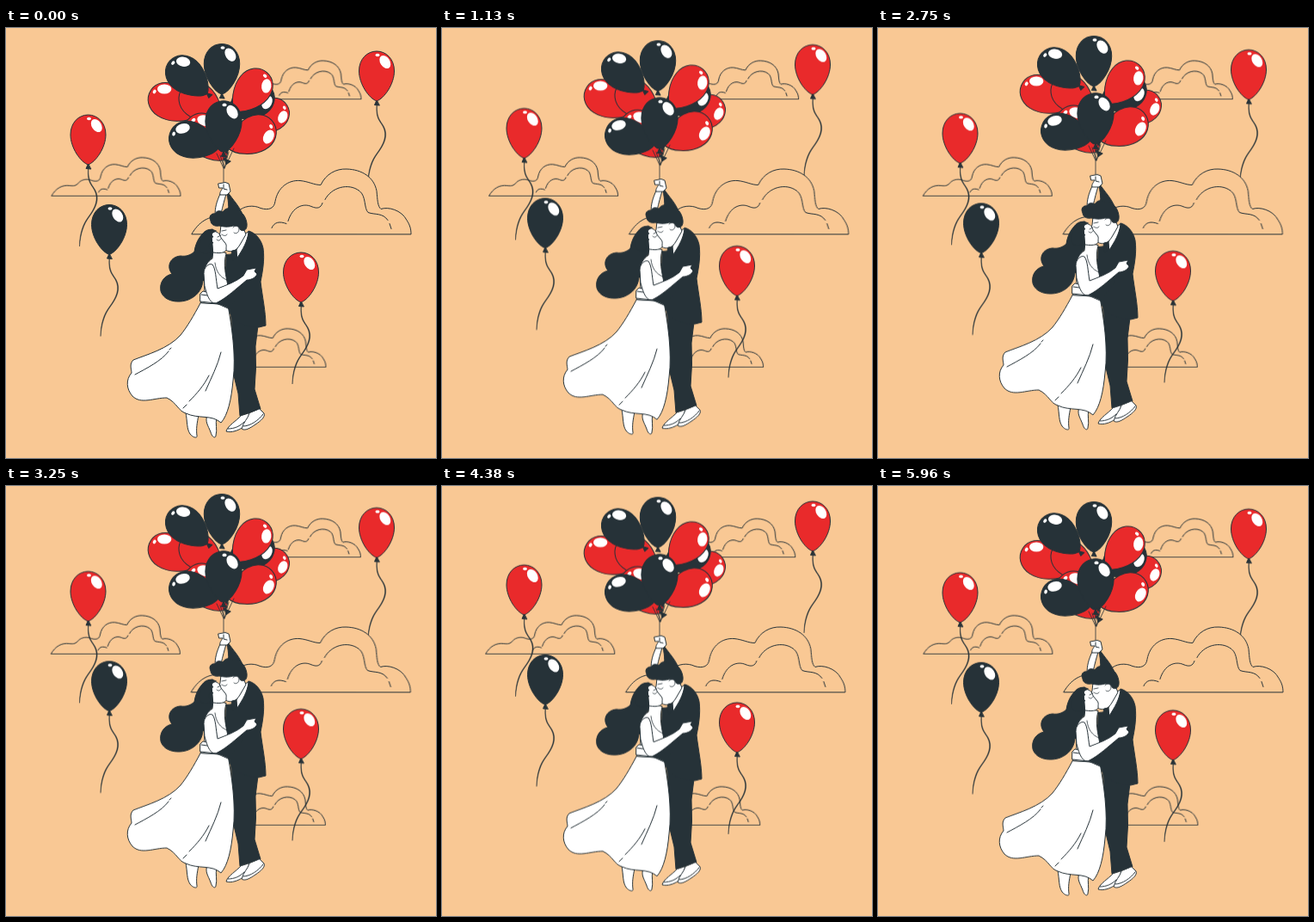
These frames come from a looping animation (500 by 500 pixels, 6 s). An HTML page:

```html
<!DOCTYPE html>
<html lang="en">
<head>
<meta charset="utf-8">
<title>Couple with balloons</title>
<style>
  html, body { margin: 0; width: 100%; height: 100%; overflow: hidden; background: #f9c894; }
  svg { display: block; width: 100%; height: 100%; }
  .line { fill: none; }
  .red { fill: #e92a2b; }
  .dark { fill: #263238; }
  .white { fill: #fff; }
  .small { stroke-width: 1.7; }
  .cloud { fill: #f9c894; animation: sway 6s linear infinite; }
  .float { animation: rise 3s linear infinite; }
  .couple { animation: rise 6s linear infinite; }
  @keyframes rise {
    50% { transform: translateY(-10px); }
  }
  @keyframes sway {
    10%, 90% { transform: translateX(-1px); }
    20%, 80% { transform: translateX(2px); }
    30%, 50%, 70% { transform: translateX(-4px); }
    40%, 60% { transform: translateX(4px); }
  }
</style>
</head>
<body>
<svg viewBox="0 0 500 500" stroke="#263238" stroke-linecap="round" stroke-linejoin="round">
  <defs>
    <g id="cloud">
      <path d="M0,0 C8,-14 20,-22 36,-20 C46,-19 48,-20 54,-26 C60,-33 72,-34 80,-30 C90,-27 96,-30 97,-38 C100,-54 112,-63 126,-62 C136,-61 142,-57 150,-57 C156,-70 168,-76 180,-75.5 C198,-75 212,-66 215,-50 C216,-40 216,-32 220,-29 C228,-32 244,-28 250,-16 C254,-10 255,-5 255,0Z"/>
      <path class="line" d="M93,-7 C96,-14 102,-15 110,-12 M112,-15 C117,-32 130,-36 139,-32 C146,-29 150,-30 152,-36 M155,-40 C162,-54 182,-60 195,-50 C203,-44 200,-30 205,-25 C213,-22 222,-25 228,-16 M230,-12 L232,-6"/>
    </g>
    <!-- balloon tip sits at 0,0 -->
    <g id="balloon">
      <path class="dark" d="M0,-1 L-2.5,4.5 L3,5Z"/>
      <path d="M0,0 C-9,-3 -20.5,-20 -20.5,-35 C-20.5,-49 -11,-58 0,-58 C11,-58 20.5,-49 20.5,-35 C20.5,-20 9,-3 0,0Z"/>
      <g class="white" stroke="none">
        <ellipse cx="9.8" cy="-45.5" rx="5.6" ry="8.2" transform="rotate(-33 9.8 -45.5)"/>
        <ellipse cx="1" cy="-53.5" rx="2.5" ry="1.8"/>
      </g>
    </g>
    <g id="loose">
      <path class="dark" stroke-width=".5" d="M0,5 C-1,20 3,22 7,29 C13,40 8,50 0,61 C-6,69 -10,80 -10,95 C-9,80 -5,69 1,61 C9,50 14,40 8,29 C4,22 0,20 0.3,5Z"/>
      <use href="#balloon"/>
    </g>
  </defs>

  <g class="float red"><use href="#loose" x="431" y="85"/></g>
  <g class="cloud">
    <use class="small" href="#cloud" transform="translate(263 82.5) scale(.588)"/>
    <use href="#cloud" transform="translate(216 239.5)"/>
    <use class="small" href="#cloud" transform="translate(53 195) scale(.588)"/>
    <use class="small" href="#cloud" transform="translate(222 394) scale(.588)"/>
  </g>
  <g class="float">
    <use class="red" href="#loose" x="95.5" y="159"/>
    <use class="dark" href="#loose" x="120" y="263.5"/>
    <use class="red" href="#loose" x="343" y="319"/>
  </g>

  <g class="couple">
    <use class="red" href="#balloon" transform="translate(217 104) rotate(-57)"/>
    <use class="red" href="#balloon" transform="translate(250 107) rotate(-50)"/>
    <use class="dark" href="#balloon" transform="translate(234 76.5) rotate(-49)"/>
    <use class="dark" href="#balloon" transform="translate(251 77) scale(1.01)"/>
    <use class="red" href="#balloon" transform="translate(281.5 118) rotate(58) scale(.92)"/>
    <use class="dark" href="#balloon" transform="translate(259 100) rotate(61)"/>
    <use class="red" href="#balloon" transform="translate(266 96) rotate(40)"/>
    <use class="red" href="#balloon" transform="translate(255 153) rotate(-40) scale(1.1)"/>
    <use class="red" href="#balloon" transform="translate(259 140.5) rotate(61) scale(1.04)"/>
    <use class="dark" href="#balloon" transform="translate(247 140) rotate(-73) scale(1.02)"/>
    <path class="line" stroke-width=".8" d="M245,146 L253,163 M249,148 L254,163 M253,146 V182 M259,144 L254,163 M265,140 L254,163"/>
    <path class="dark" stroke="none" d="M252,151 L257,150 L255,155Z"/>
    <use class="dark" href="#balloon" transform="translate(253 144.5) scale(1.03)"/>

    <!-- man -->
    <path class="dark" d="M262,335 L293,346 L290,370 L290.5,395 L289,420 L296,443 L272,451 L270,425 L264,400Z"/>
    <g class="white">
      <path d="M273,451 C268,457 258,462 256,469 C262,471 270,468 276,464 C280,460 283,456 283,448Z"/>
      <path d="M283,448 C281,455 276,458 274,466 C278,469 284,465 290,461 C296,457 302,452 300,448 L295,443Z"/>
      <path class="line" d="M258,466 C266,466 272,463 277,458 M276,463 C284,463 294,456 299,449"/>
    </g>
    <path class="dark" d="M268,262 L282,236 C290,238 297,246 299,256 C301,270 298,285 296,295 C298,312 302,330 302,346 L294,348 C280,348 266,342 262,335 L256,322 L243,321 L255,300 L256,264Z"/>
    <path class="dark" d="M258,191 C263,199 273,208 277,222 L256,224 C260,212 259,203 257,193Z"/>
    <path class="white" d="M249,193 C245,202 243,208 243,219 L250,216 C252,207 254,200 256,193Z"/>
    <path class="white" d="M247,181 L255,179.5 L259,181 L261,190 L257,194 L249,194 C248,191 251,188 252,186 L248,186Z"/>
    <path class="line" d="M253,182 L253,187 L257,188"/>
    <path class="white" d="M268,258 L278,239 L282,237 C281,248 275,258 269,267Z"/>
    <path class="white" d="M250,229 L249,238 L246,246 L254,250 L255,258 C262,262 268,259 272,252 L279,240 L274,228Z"/>
    <path class="dark" d="M263,259 L268,258 L268,266 L264,271 L262,266Z"/>
    <path class="dark" d="M238,224 C235,219 239,215 243,216 C245,212 249,212 252,214 C256,208 261,209 265,213 C273,210 279,219 280,227 C281,234 277,237 273,235 L270,231 L264,230 C258,232 252,231 248,230 C243,231 238,229 238,224Z"/>
    <path class="white" stroke-width=".8" d="M264,232 C266,229 271,230 271,234 C271,238 267,240 265,238"/>
    <path class="line" stroke-width=".8" d="M251,240 C253,242 256,242 257,240 M251,236 L256,235"/>

    <!-- woman -->
    <path class="dark" d="M240,234 C229,235 221,246 219,260 C215,264 209,266 203,265 C191,266 186,277 193,286 C184,288 178,296 180,306 C184,319 202,320 212,316 C222,312 228,304 229,294 C234,290 236,280 235,272 L246,260Z"/>
    <g class="white">
      <path d="M209,447 C211,458 210,466 214,472 C218,477 223,477 222,474 C221,466 222,460 224,450Z"/>
      <path d="M234,450 C231,458 235,462 238,470 C240,477 244,477 244,474 C246,466 243,461 245,453Z"/>
      <path d="M241,258 L240,268 C234,272 231,277 230,285 L231,308 L226,320 L257,322 L258,300 C256,288 252,276 256,262Z"/>
      <path d="M226,320 C218,335 211,347 203,357 C189,373 163,380 148,386 C143,391 146,397 146,401 C139,409 140,420 147,428 C157,438 172,430 187,430 C199,436 200,445 209,448 C224,455 239,449 250,459 C258,450 262,432 264,410 C268,380 262,345 258,322Z"/>
      <path d="M239,237 C246,235 249,240 250,244 L254,249 C257,252 256,254 256,256 C257,260 252,263 241,261Z"/>
    </g>
    <path class="dark" d="M244,236 C238,232 230,235 227,242 L225,258 C229,264 236,264 238,258 C234,254 236,249 241,250 C237,246 237,243 241,243 C237,239 241,238 244,236Z"/>
    <path class="line" stroke-width=".8" d="M246,243 L250,241 M245,246 C247,248 249,247 250,245 M243,273 C244,283 249,290 257,293"/>
    <path class="line" d="M150,403 C163,396 181,387 189,376 M190,374 L192,372 M206,442 L210,438 M213,434 C222,425 230,416 236,404 M232,422 C239,406 246,393 250,377"/>
    <path class="dark" d="M243,319 C250,315 256,307 259,298 L272,292 L275,306 L259,326Z"/>
    <path class="white" d="M226,309 L229,306 L238,308 L244,320 L226,318Z"/>
    <path class="line" d="M227,310 L234,311"/>
    <path class="white" d="M230,285 C230,278 236,273 240,275 C244,280 244,292 246,303 C256,299 268,295 276,288 L280,281 L291,279 L289,283 L292,286 C290,291 284,293 280,293 C268,303 256,314 246,319 C238,323 234,312 231,300Z"/>
  </g>
</svg>
</body>
</html>
```
